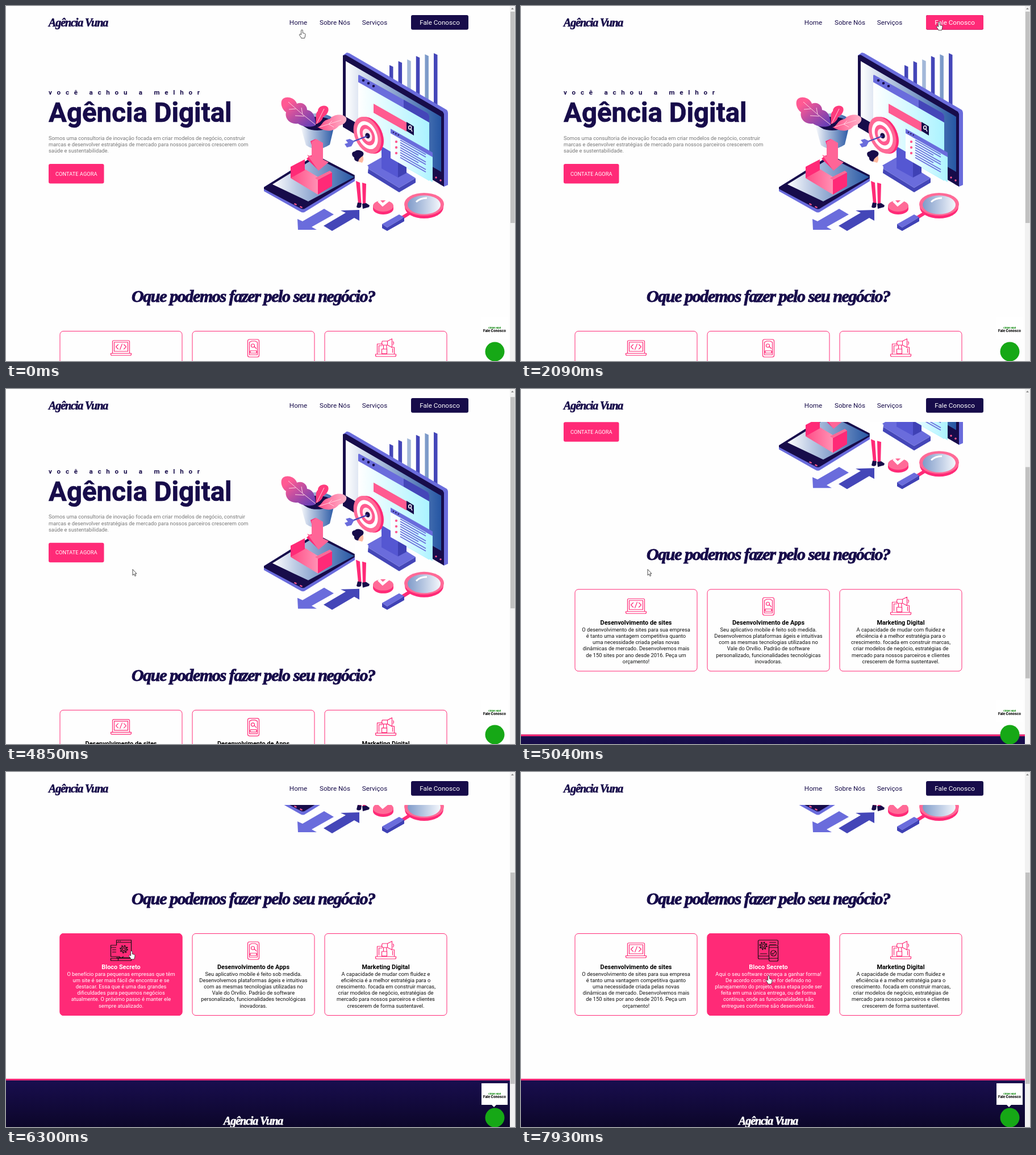
An HTML page for the animation above (8000 ms loop, 896 by 625 pixels).

```html
<!DOCTYPE html>
<html lang="pt">
<head>
<meta charset="utf-8">
<title>Agência Vuna</title>
<style>
html, body { margin: 0; width: 100%; height: 100%; overflow: hidden; background: #fefefe; }
svg { display: block; width: 896px; height: 625px; }
text { font: 9.333px Roboto, sans-serif; fill: #170c4a; }
.mid { text-anchor: middle; }
.nav { font-size: 11.667px; }
.script { font: italic bold 20px "Liberation Serif", serif; letter-spacing: -1.1px; stroke: #170c4a; stroke-width: .6; }
.title { font-size: 30px; letter-spacing: -1.4px; stroke-width: 1; }
.lead { font-size: 11.667px; font-weight: 700; letter-spacing: 8.75px; }
.big { font-size: 47.4px; font-weight: 700; stroke: #170c4a; stroke-width: .7; }
.gray { fill: #777; }
.card text { fill: #111; }
.card .head { font-size: 10.92px; font-weight: 700; fill: #000; }
.white, .hot text, .hot .head { fill: #fff; }
.chat { font: 800 6px Inter, sans-serif; fill: #000; }
.icon { fill: none; stroke: #ff2a77; stroke-width: 1.2; stroke-linejoin: round; stroke-linecap: round; }
.hot .icon { stroke: #111; }
</style>
</head>
<body>
<svg viewBox="0 0 896 625">
<defs>
  <linearGradient id="screen"><stop offset="0" stop-color="#fff"/><stop offset=".3" stop-color="#b9c8e2"/><stop offset="1" stop-color="#2556a3"/></linearGradient>
  <linearGradient id="lens"><stop offset="0" stop-color="#7f9bc9"/><stop offset="1" stop-color="#f4f7fc"/></linearGradient>
  <linearGradient id="glass"><stop offset="0" stop-color="#fff"/><stop offset="1" stop-color="#abf3ff"/></linearGradient>
  <linearGradient id="leaf" x2="1" y2="1"><stop offset=".2" stop-color="#ff5a93"/><stop offset=".9" stop-color="#6c3fb5"/></linearGradient>
  <linearGradient id="blush"><stop offset="0" stop-color="#ff4c86"/><stop offset="1" stop-color="#ffb6cc"/></linearGradient>
  <linearGradient id="night" x2="0" y2="1"><stop offset="0" stop-color="#190e50"/><stop offset="1" stop-color="#0a0524"/></linearGradient>
</defs>

<g id="page">
  <text class="lead" x="75" y="156">você achou a melhor</text>
  <text class="big" x="75" y="204">Agência Digital</text>
  <g id="intro"></g>

  <g id="bars"></g>

  <!-- monitor -->
  <path fill="#6a6cdc" d="M593 87L600 82 604 83 776 183Q778 185 778 188V315L771 318 680 250z"/>
  <path fill="#170c4a" d="M593 87L598 86 769 186 771 190V318L593 213z"/>
  <path fill="url(#screen)" d="M598 97L766 195V292L598 195z"/>
  <path fill="url(#glass)" d="M620 132L745 203V308L620 236z"/>
  <path fill="#6a6cdc" d="M620 123Q620 120 623 122L741 188Q745 191 745 195V205L620 134z"/>
  <path fill="#4446b8" d="M700 165L741 188Q745 191 745 195V205L700 179z"/>
  <g fill="#170c4a"><circle cx="629" cy="131" r="2.3"/><circle cx="638" cy="136" r="2.3"/><circle cx="647" cy="141" r="2.3"/></g>
  <path fill="#ff5a90" d="M647 172L705 205V221L647 188z"/>
  <path fill="#170c4a" d="M705 204L718 212V228L705 220z"/>
  <path fill="none" stroke="#fff" stroke-width="1.5" d="M713 217L715 221M713.5 214a2.4 3 0 1 1-4.8 0a2.4 3 0 1 1 4.8 0"/>
  <g fill="#ff5a90"><circle cx="757" cy="302" r="1.7"/><circle cx="765" cy="307" r="1.7"/></g>

  <!-- stand -->
  <path fill="#4446b8" d="M632 283L692 320 721 303V311L692 328 632 291z"/>
  <path fill="#6a6cdc" d="M632 283L662 266 721 303 692 320z"/>
  <path fill="#5557d2" d="M661 247L690 264V302L661 286z"/>
  <path fill="#3f41b5" d="M690 264L705 273V294L690 302z"/>

  <!-- floating list -->
  <path fill="url(#glass)" d="M677 222L751 264V310L677 268z"/>
  <path fill="#6a6cdc" d="M677 216L751 258V266L677 224z"/>
  <path fill="none" stroke="#170c4a" stroke-width="2" stroke-dasharray="2 3" d="M681 222L694 229"/>
  <g id="lines" stroke="#6a6cdc" stroke-width="1.7"></g>
  <g fill="#ff5a90"><circle cx="687" cy="239" r="2.2"/><circle cx="687" cy="249" r="2.2"/><circle cx="687" cy="259" r="2.2"/></g>

  <!-- plant -->
  <ellipse cx="548" cy="205" rx="31" ry="16" fill="url(#screen)"/>
  <ellipse cx="548" cy="207" rx="27" ry="12" fill="#170c4a"/>
  <path fill="url(#screen)" d="M517 206Q547 234 579 206L570 244Q548 259 528 245z"/>
  <path fill="url(#leaf)" d="M545 210C535 215 521 212 514 207 500 209 490 198 493 187 484 181 482 167 488 163 497 157 510 164 512 172 522 168 530 175 530 183 542 185 545 197 545 210z"/>
  <path fill="#ff3c7d" d="M545 208C547 200 543 190 549 185 549 176 562 172 567 179 570 187 562 193 558 196 556 203 550 207 545 208z"/>
  <path fill="url(#blush)" d="M548 213C556 214 556 200 570 199 576 190 594 189 599 197 601 206 592 209 586 211 577 222 562 222 548 213z"/>
  <path fill="none" stroke="#ffd0df" d="M545 209Q520 190 497 169M522 191L520 179M525 194L509 193M510 181L498 182M547 207L560 181M552 213L590 201M568 208L574 202M568 208L577 213"/>

  <!-- tablet -->
  <path fill="#6a6cdc" d="M454 319L545 263 616 299V307L527 362Q523 365 518 362L454 326z"/>
  <path fill="#170c4a" d="M454 319L545 262 616 299V302L527 356Q523 359 518 356L454 322z"/>
  <path fill="url(#screen)" d="M469 314L545 267 613 301 532 344z"/>
  <path fill="#ff5a90" d="M508 347l4 2-1 2-4-2zM518 352l4 2-1 2-4-2z"/>
  <path fill="url(#blush)" d="M501 303L526 287 574 316 549 332z"/>
  <path fill="#ff2a77" d="M501 283L526 270V289L501 303zM549 306L574 293V317L549 332z"/>
  <path fill="#ff6a97" d="M549 306L544 303 570 290 574 293z"/>
  <path fill="#ff2a77" d="M536 238L545 234 540 262 534 264 529 269 551 290z"/>
  <path fill="#ff6597" d="M538 239L546 234 558 241V270L568 275 550 290 530 262 538 265z"/>

  <!-- dartboard -->
  <g transform="rotate(-24 637 227)">
    <ellipse cx="640" cy="229" rx="22" ry="34" fill="#ff2a77"/>
    <ellipse cx="636" cy="227" rx="22" ry="34" fill="#ff6a97"/>
    <ellipse cx="636" cy="227" rx="16.500" ry="26" fill="#fff"/>
    <ellipse cx="636" cy="227" rx="12" ry="19" fill="#ff5a90"/>
    <ellipse cx="636" cy="227" rx="7.500" ry="12" fill="#ffe8ef"/>
    <ellipse cx="636" cy="228" rx="4" ry="5" fill="#170c4a"/>
  </g>
  <path stroke="#4446b8" stroke-width="2.2" d="M636 229L602 242"/>
  <path fill="#6a6cdc" d="M613 238L605 234 598 236 602 241 596 243 600 249 608 247z"/>

  <!-- person -->
  <path fill="#fff" d="M617 276Q613 280 614 309L635 313 638 283 630 273z"/>
  <path fill="#ffb99f" d="M619 267L628 263Q631 270 627 276L620 274z"/>
  <path fill="#170c4a" d="M610 264Q607 257 614 256 618 252 625 255 632 258 628 264 621 268 620 274 612 273 613 267z"/>
  <path fill="#ff2a77" d="M616 308L623 311 625.500 348H620zM627 311L634 313 633 349H628z"/>
  <path fill="#170c4a" d="M619 346L626 347 625 354Q621 357 617 354zM627 348L634 347 640 351 639 354 628 357z"/>

  <!-- floor arrows -->
  <path fill="#6a6cdc" d="M513 375L522 379 560 357 577 367 538 389 547 394 514 394z"/>
  <path fill="#4446b8" d="M559 387L598 364 589 360 622 359V378L613 373 574 396z"/>

  <!-- badge -->
  <path fill="#ff2a77" d="M646 351v6a18 10 0 0 0 36 0v-6z"/>
  <ellipse cx="664" cy="352" rx="18" ry="10" fill="#ff6a97"/>
  <path fill="none" stroke="#fff" stroke-width="5" d="M656 343L663 350 674 341"/>

  <!-- magnifier -->
  <path stroke="#ff2a77" stroke-width="6" d="M713 363L697 373"/>
  <path fill="#6a6cdc" d="M662 384L692 367 701 372 671 390z"/>
  <path fill="#3f41b5" d="M662 384L671 390 701 372V379L671 396 662 391z"/>
  <ellipse cx="736" cy="354" rx="34" ry="20" fill="#ff2a77"/>
  <ellipse cx="736" cy="349" rx="35" ry="20" fill="#ff6a97"/>
  <ellipse cx="736" cy="350" rx="29" ry="16.500" fill="url(#lens)"/>
  <path fill="none" stroke="#fff" stroke-width="3" d="M722 345Q729 338 741 338"/>

  <text class="script title" x="221" y="521">Oque podemos fazer pelo seu negócio?</text>
  <g id="cards"></g>

  <path fill="url(#night)" d="M0 828H887V925H0z"/>
  <path fill="#ff2a77" d="M0 828H887V831H0z"/>
  <text class="script white" x="383" y="909" style="stroke:#fff">Agência Vuna</text>
</g>

<path fill="#fefefe" d="M0 0H887V58H0z"/>
<text class="script" x="75" y="36">Agência Vuna</text>
<g id="menu"></g>

<path fill="#fff" d="M837 548H883V586H863L859 590 855 586H837z"/>
<text class="chat mid" x="860" y="568" style="font-size:4px;fill:#138a13">Clique aqui</text>
<text class="chat mid" x="860" y="574">Fale Conosco</text>
<circle cx="860.5" cy="608.5" r="17" fill="#16a816"/>

<path fill="#f1f1f1" d="M887 0H896V625H887z"/>
<path fill="#8a8a8a" d="M889 6L891.5 3 894 6z"/>
<rect id="thumb" x="888" y="10" width="7.5" height="372" fill="#c1c1c1"/>

<g id="cursor" stroke="#222" stroke-width=".8" stroke-linejoin="round" fill="#fff">
  <path id="arrow" d="M0 0V10.5L2.4 8.3 4 12 5.7 11.2 4.1 7.6H7z"/>
  <path id="hand" d="M-1.4 1.4a1.4 1.4 0 0 1 2.8 0V5.5L4.7 6.3Q6.2 6.8 6 8.5L5.4 12 4.5 14.7H-1.2L-2 12.6-4.4 9.3Q-5 7.6-3.2 7.3L-1.4 8.6z"/>
</g>
</svg>

<script>
const $ = id => document.getElementById(id);
const NAVY = '#170c4a', PINK = '#ff2a77';
const fill = (id, html) => $(id).innerHTML = html;
const box = (x, y, w, h, r, color) => `<rect x="${x}" y="${y}" width="${w}" height="${h}" rx="${r}" fill="${color}"/>`;
const label = (x, y, str, cls) => `<text class="${cls}" x="${x}" y="${y}">${str}</text>`;
const lines = (x, y, rows, cls) => rows.map((row, i) => label(x, y + i * 11.2, row, cls)).join('');

// A label on a plate, with its hover look stacked above
function button(id, x, y, w, h, str, drop, hotClass, base, hover, baseClass) {
  const face = (plate, cls) => box(x, y, w, h, 3, plate) + label(x + w / 2, y + h / 2 + drop, str, 'mid ' + cls);
  return face(base, baseClass) + `<g id="${id}">${face(hover, hotClass)}</g>`;
}

fill('intro', lines(75, 235.5, [
  'Somos uma consultoria de inovação focada em criar modelos de negócio, construir',
  'marcas e desenvolver estratégias de mercado para nossos parceiros crescerem com',
  'saúde e sustentabilidade.'], 'gray') +
  button('contact', 75, 278, 97.5, 34.5, 'CONTATE AGORA', 3.3, 'white', PINK, NAVY, 'white'));

fill('menu',
  button('home', 489, 7, 51, 43, 'Home', 4.5, 'nav white', 'none', PINK, 'nav') +
  button('about', 542, 7, 74, 43, 'Sobre Nós', 4.5, 'nav white', 'none', PINK, 'nav') +
  button('services', 617, 7, 64, 43, 'Serviços', 4.5, 'nav white', 'none', PINK, 'nav') +
  button('talk', 713, 16, 101, 25.7, 'Fale Conosco', 4.2, 'nav white', NAVY, PINK, 'nav white'));

fill('bars', [[104, '#4446b8'], [97, '#4446b8'], [94, '#a3b8d9'], [88, '#4446b8'], [85, '#7d9bc9'], [83, '#4446b8']]
  .map(([top, color], i) => `<path fill="${color}" d="M${675 + i * 15.6} ${top}l6.5 3V185h-6.5z"/>`).join(''));

fill('lines', [...Array(8)].map((_, i) =>
  `<path d="M694 ${236 + i * 4.4}l${i % 3 == 2 ? 32 : 45} ${i % 3 == 2 ? 18 : 25.5}"/>`).join(''));

// Icons are drawn around x = 0, in page height
const gear = (x, y, r) => `<circle cx="${x}" cy="${y}" r="${r}"/><circle cx="${x}" cy="${y}" r="${r + 1.4}" stroke-width="2" stroke-dasharray="2 ${(r + 1.4) * Math.PI / 4 - 2}" stroke-linecap="butt"/><circle cx="${x}" cy="${y}" r="${r / 2}"/>`;
const icons = {
  laptop: '<path d="M-15 611V591q0-2 2-2H13q2 0 2 2V611M-12 608V592H12V608zM-18 611.5H18V613q0 2-2 2H-16q-2 0-2-2zM-5 596l-4 4 4 4M5 596l4 4-4 4M2 595l-4 10"/>',
  phone: '<rect x="-10" y="587" width="20" height="31" rx="3"/><path d="M-7 592V614H7V592L3 590H-3zM2 600l3 3M-5 607H5q2 2 0 4H-5q-2-2 0-4z"/><circle cx="-1" cy="598" r="3"/>',
  megaphone: '<path d="M-15 613V595H-6M10 601H15V613M-12 610V598H-7M12 603V610M-18 613H18V615q0 2-2 2H-16q-2 0-2-2zM-6 590H3L11 586V601L3 597H-6q-2-3 0-7zM3 590V597M13 591q2 2 0 5M-4 597V604H-7V612H2V604L1 597M-4 604H2"/>',
  windows: '<path d="M-8 593V584H18V615H-8M-8 588H18M-5 586h1M-2 586h1M-18 613V593H-8M-18 597H-9M-15 601H-9M-15 605H-9M-18 613H-3L0 616 4 613M-18 616V620H18V616zM-5 620V616H5"/>' + gear(5, 600, 5),
  devices: '<path d="M0 617H-16q-2 0-2-2V586q0-2 2-2H15q2 0 2 2V592M-18 612H0M2 588H13M2 592H13M-14 608H-3"/><rect x="1" y="593" width="16" height="28" rx="2"/><path d="M1 597H17M1 616H17M6 607l2 2 4-5"/><circle cx="9" cy="607" r="5"/>' + gear(-9, 594, 5)
};

function face(x, icon, head, rows, hot) {
  return `<g class="card ${hot ? 'hot' : ''}"><rect x="${x - 107.5}" y="572.5" width="215" height="144" rx="6" stroke="${PINK}" fill="${hot ? PINK : '#fefefe'}"/>
    <g class="icon" transform="translate(${x})">${icons[icon]}</g>
    ${label(x, 634.7, head, 'mid head')}${lines(x, 646.5, rows, 'mid')}</g>`;
}
fill('cards',
  face(202.5, 'laptop', 'Desenvolvimento de sites', ['O desenvolvimento de sites para sua empresa',
    'é tanto uma vantagem competitiva quanto', 'uma necessidade criada pelas novas',
    'dinâmicas de mercado. Desenvolvemos mais', 'de 150 sites por ano desde 2016. Peça um', 'orçamento!']) +
  face(435.5, 'phone', 'Desenvolvimento de Apps', ['Seu aplicativo mobile é feito sob medida.',
    'Desenvolvemos plataformas ágeis e intuitivas', 'com as mesmas tecnologias utilizadas no',
    'Vale do Orvílio. Padrão de software', 'personalizado, funcionalidades tecnológicas', 'inovadoras.']) +
  face(668.5, 'megaphone', 'Marketing Digital', ['A capacidade de mudar com fluidez e',
    'eficiência é a melhor estratégia para o', 'crescimento. focada em construir marcas,',
    'criar modelos de negócio, estratégias de', 'mercado para nossos parceiros e clientes', 'crescerem de forma sustentavel.']) +
  '<g id="sites">' + face(202.5, 'windows', 'Bloco Secreto', ['O benefício para pequenas empresas que têm',
    'um site é ser mais fácil de encontrar e se', 'destacar. Essa que é uma das grandes',
    'dificuldades para pequenos negócios', 'atualmente. O próximo passo é manter ele', 'sempre atualizado.'], true) + '</g>' +
  '<g id="apps">' + face(435.5, 'devices', 'Bloco Secreto', ['Aqui o seu software começa a ganhar forma!',
    'De acordo com o que for definido no', 'planejamento do projeto, essa etapa pode ser',
    'feita em uma única entrega, ou de forma', 'contínua, onde as funcionalidades são', 'entregues conforme são desenvolvidas.'], true) + '</g>');

const LOOP = 8000, FADE = 110;
const clamp = v => Math.max(0, Math.min(1, v));
const smooth = v => v * v * (3 - 2 * v);

// Hover periods in ms
const hovers = { home: [10, 720], about: [720, 1450], services: [1450, 1930], talk: [1930, 2500],
  contact: [3310, 3960], sites: [5330, 7270], apps: [7330, 8200] };
const hands = [[0, 2500], [3290, 3960], [5740, 7270], [7330, 8000]];

const path = [[0, 521, 42], [60, 521, 42], [130, 520, 36], [450, 520, 36], [1070, 582, 35], [1360, 582, 35],
  [1580, 650, 34], [1850, 650, 34], [2080, 736, 28], [2490, 736, 28], [3300, 144, 289], [3380, 141, 293],
  [3920, 141, 293], [4280, 223, 317.5], [5739, 223, 317.5], [5740, 221, 313], [6290, 221, 313], [6300, 221, 315],
  [7070, 262, 346], [7640, 428, 359], [7850, 428, 359], [7930, 436, 358.5]];
const scroll = [[4840, 0], [4850, 7], [4900, 14], [4980, 120], [5040, 219.5], [5100, 234], [5180, 264], [5290, 288]];

function track(keys, t, ease = v => v) {
  const next = keys.findIndex(k => k[0] > t);
  if (next < 1) return (next ? keys[keys.length - 1] : keys[0]).slice(1);
  const a = keys[next - 1], b = keys[next], k = ease((t - a[0]) / (b[0] - a[0]));
  return a.slice(1).map((v, i) => v + (b[i + 1] - v) * k);
}

function draw() {
  const t = performance.now() % LOOP;
  const [top] = track(scroll, t), [x, y] = track(path, t, smooth);
  $('page').setAttribute('transform', `translate(0 ${-top})`);
  $('thumb').setAttribute('y', 10 + top * .58);
  $('cursor').setAttribute('transform', `translate(${x} ${y})`);
  const hand = hands.some(([from, to]) => t >= from && t < to);
  $('hand').style.display = hand ? '' : 'none';
  $('arrow').style.display = hand ? 'none' : '';
  for (const id in hovers) {
    const [from, to] = hovers[id];
    $(id).style.opacity = clamp((t - from) / FADE) * clamp(1 - (t - to) / FADE);
  }
  requestAnimationFrame(draw);
}
draw();
</script>
</body>
</html>
```
